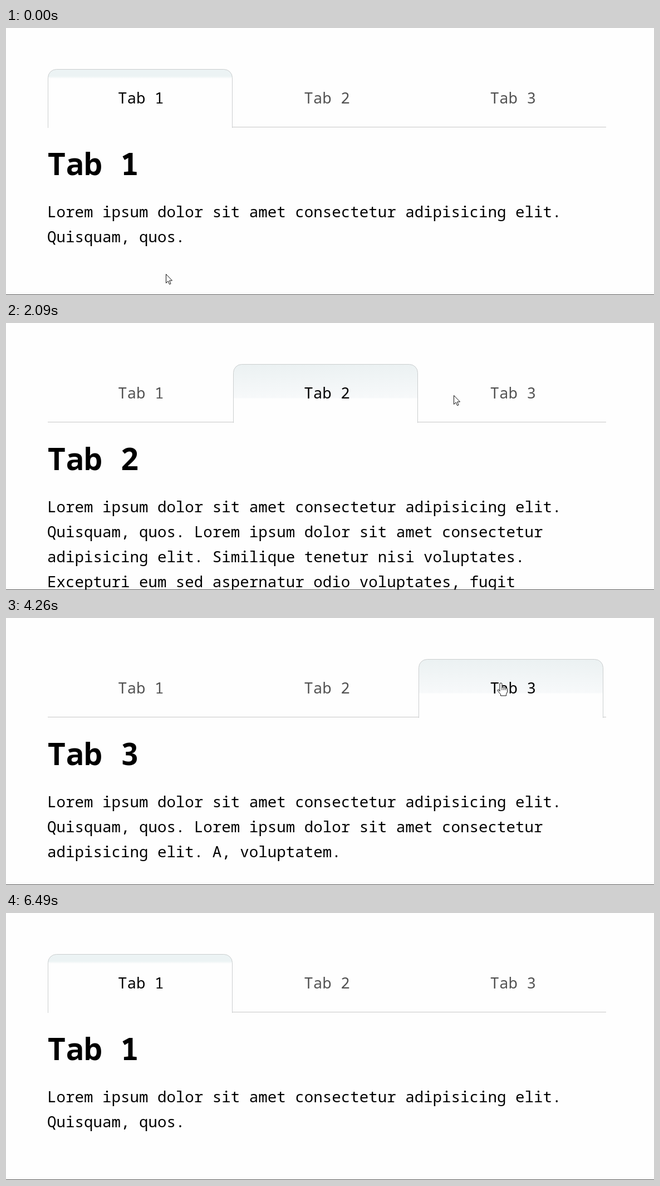
Recreate the animation shown at these times as an HTML page. Size 1164x481 px, loop 6.83 s.

```html
<!DOCTYPE html>
<html lang="en">
<head>
<meta charset="utf-8">
<title>Sliding tabs</title>
<style>
  html, body { margin: 0; width: 100%; height: 100%; overflow: hidden; background: #fefefe; }
  svg { display: block; }
  text { font: 27.49px "Noto Sans Mono", "DejaVu Sans Mono", monospace; white-space: pre; }
  .label { text-anchor: middle; }
  .title { font-size: 54.7px; font-weight: 700; }
  #cursor path { fill: #fff; stroke: #111; stroke-linejoin: round; }
  #cursor #beam { fill: none; }
</style>
</head>
<body>
<svg width="1164" height="481" viewBox="0 0 1164 481">
  <defs>
    <linearGradient id="short" gradientUnits="userSpaceOnUse" x1="0" y1="74" x2="0" y2="180">
      <stop offset=".12" stop-color="#ecf3f4"/>
      <stop offset=".165" stop-color="#fefefe"/>
    </linearGradient>
    <linearGradient id="long" gradientUnits="userSpaceOnUse" x1="0" y1="74" x2="0" y2="180">
      <stop offset="0" stop-color="#ebf1f2"/>
      <stop offset=".57" stop-color="#f7f9fa"/>
      <stop offset=".59" stop-color="#fefefe"/>
    </linearGradient>
  </defs>
  <rect x="75" y="178" width="1003" height="1" fill="#c8c8c8"/>
  <path id="tab" stroke="#cbcecf" d="M.5 180V89.5a15 15 0 0 1 15-15H316.5a15 15 0 0 1 15 15V180"/>
  <g id="words"></g>
  <rect y="480" width="1164" height="1" fill="#555"/>
  <g id="cursor">
    <path id="arrow" d="M.5 .5V16.5L4.2 13L6.6 18.7L9 17.7L6.6 12H11.5Z"/>
    <path id="hand" d="M-2 15V2a2 2 0 0 1 4 0V9a1.8 2 0 0 1 3.5 0a1.8 1.6 0 0 1 3.3 1a1.6 1.6 0 0 1 2.8 2V16L9.5 20.5V23H-.5V20.5L-5.5 14.5Q-6.5 12.5-5 12T-2 15ZM2 9v4m3.5-4v4m3.3-3v3"/>
    <path id="beam" d="M-3-7.5h2l1 1l1-1h2M0-6.5v13M-3 7.5h2l1-1l1 1h2"/>
  </g>
</svg>
<script>
const LOOP = 6830, GONE = 6490;
const LEFT = 75, THIRD = 1003 / 3, STEP = 333, SLIDE = 300, LAG = 15;
const CHAR = 16.494, BASE = 341, LINE = 45;
const $ = id => document.getElementById(id);
const centre = i => LEFT + THIRD * (i + .5);

const first = 'Lorem ipsum dolor sit amet consectetur adipisicing elit.';
const second = 'Quisquam, quos. Lorem ipsum dolor sit amet consectetur';
const pages = [
  [first, 'Quisquam, quos.'],
  [first, second, 'adipisicing elit. Similique tenetur nisi voluptates.',
    'Excepturi eum sed aspernatur odio voluptates, fugit'],
  [first, second, 'adipisicing elit. A, voluptatem.']
];

function addText(kind, x, y, content = '') {
  const el = document.createElementNS('http://www.w3.org/2000/svg', 'text');
  el.setAttribute('class', kind);
  el.setAttribute('x', x);
  el.setAttribute('y', y);
  el.textContent = content;
  return $('words').appendChild(el);
}
const labels = pages.map((_, i) => addText('label', centre(i), 136, 'Tab ' + (i + 1)));
const title = addText('title', LEFT - .5, 264.5);
const rows = pages[1].map((_, i) => addText('row', LEFT - 1, BASE + LINE * i));

// Each click swaps the page at once; the tab shape follows.
const clicks = [
  { at: -LOOP, from: 0, to: 0 },
  { at: 1760, from: 0, to: 1 },
  { at: 3670, from: 1, to: 2 },
  { at: 5090, from: 2, to: 0 }
];

// The pointer glides to each stop and rests there until the next glide.
const glide = (start, end, x, y) => ({ start, end, x, y });
const over = (start, end, tab, dx) => glide(start, end, centre(tab) + dx, 117);
const glides = [
  glide(0, 0, 287, 443),
  glide(430, 550, 196, 400),
  glide(700, 1240, 682, 156),
  glide(1580, 1740, 587, 125),
  glide(1880, 2240, 957, 133),
  glide(2270, 2570, 985, 149),
  glide(2600, 3050, 968, 112),
  over(3910, 4260, 2, -21),
  over(4260, 4940, 0, 14),
  glide(5150, 5390, 418, 338),
  glide(5390, 5520, 426, 266),
  glide(5670, 5940, 103, 298),
  glide(5940, 6460, 511, 240)
];

const clamp = k => Math.min(1, Math.max(0, k));
const mix = (a, b, k) => a + (b - a) * k;

// CSS "ease" curve, solved by bisection
function ease(x) {
  if (x <= 0 || x >= 1) return clamp(x);
  let lo = 0, hi = 1;
  for (let i = 0; i < 20; i++) {
    const s = (lo + hi) / 2;
    if (.75 * s * (1 - s) + s ** 3 < x) lo = s; else hi = s;
  }
  const r = 1 - lo;
  return .3 * lo * r * r + 3 * lo * lo * r + lo ** 3;
}

function pointerAt(t) {
  const i = glides.findLastIndex(g => g.start <= t);
  const to = glides[i], from = glides[i - 1] || to;
  const k = clamp((t - to.start) / (to.end - to.start || 1));
  return [mix(from.x, to.x, k), mix(from.y, to.y, k)];
}

function pointerKind(x, y, page) {
  if (y > 95 && y < 148 && pages.some((_, i) => Math.abs(x - centre(i)) < 65)) return 'hand';
  const line = pages[page][Math.floor((y - BASE) / LINE + .73)];
  const overText = line && x > LEFT && x < LEFT + line.length * CHAR;
  const overTitle = y > 215 && y < 275 && x > LEFT && x < 240;
  return overText || overTitle ? 'beam' : 'arrow';
}

let shown = -1;
function showPage(n) {
  if (n === shown) return;
  shown = n;
  title.textContent = 'Tab ' + (n + 1);
  rows.forEach((row, i) => row.textContent = pages[n][i] || '');
}

function draw(t) {
  const { at, from, to } = clicks.findLast(c => c.at <= t);
  const p = ease((t - at - LAG) / SLIDE);
  showPage(to);

  $('tab').setAttribute('transform', `translate(${LEFT + STEP * mix(from, to, p)} 0)`);
  $('tab').setAttribute('fill', `url(#${to && p > .5 ? 'long' : 'short'})`);
  labels.forEach((label, i) => {
    const v = Math.round(82 * mix(+(i !== from), +(i !== to), p));
    label.setAttribute('fill', `rgb(${v},${v},${v})`);
  });

  const [x, y] = pointerAt(t);
  const kind = pointerKind(x, y, to);
  for (const id of ['arrow', 'hand', 'beam'])
    $(id).style.display = id === kind ? '' : 'none';
  $('cursor').style.display = t < GONE ? '' : 'none';
  $('cursor').setAttribute('transform', `translate(${Math.round(x)} ${Math.round(y)})`);
}

const start = performance.now();
function tick() {
  draw((performance.now() - start) % LOOP);
  requestAnimationFrame(tick);
}
tick();
</script>
</body>
</html>
```
